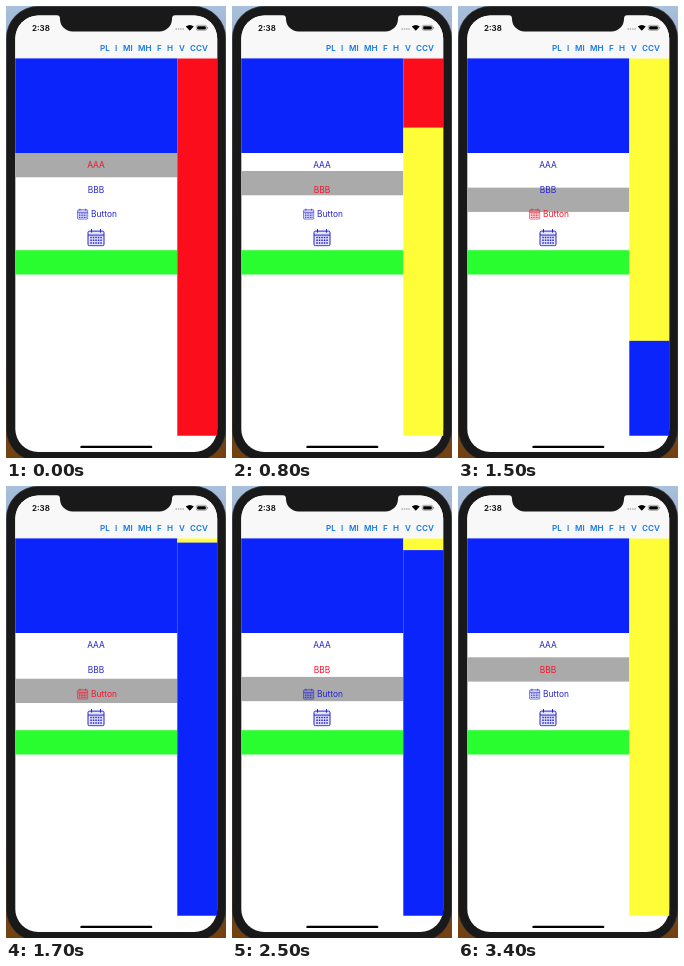
An HTML page for the animation above (3.5 s loop, 220 by 452 pixels).

```html
<!DOCTYPE html>
<html lang="en">
<head>
<meta charset="utf-8">
<title>Paged column with sliding selection</title>
<style>
  html, body { margin: 0; width: 100%; height: 100%; overflow: hidden; background: #000; }
  svg { display: block; width: 220px; height: 452px; font: 8.4px Inter, Roboto, sans-serif; }
  .item { color: #2222d4; fill: currentColor; }
  .item.on { color: #f5122a; }
  .nav { fill: #1678e8; font-weight: 600; font-size: 8.1px; }
</style>
</head>
<body>
<svg viewBox="0 0 220 452">
  <defs>
    <linearGradient id="wall" x2="0" y2="1">
      <stop offset="0" stop-color="#a9c0de"/>
      <stop offset=".5" stop-color="#55606e"/>
      <stop offset="1" stop-color="#74410f"/>
    </linearGradient>
    <clipPath id="column"><rect x="171.3" y="52.4" width="39.9" height="377.3"/></clipPath>
    <symbol id="calendar" viewBox="0 0 18 18">
      <g fill="none" stroke="currentColor">
        <rect x="1" y="2.5" width="16" height="14.7" rx="1.5" fill="currentColor" fill-opacity=".12"/>
        <path d="M1 6.5H17M4.5 .5V4M13.5 .5V4"/>
        <path d="M3.3 9H15M3.3 11.7H15M3.3 14.4H15" stroke-width="1.5" stroke-dasharray="1.5 1"/>
      </g>
    </symbol>
  </defs>

  <rect width="220" height="452" fill="url(#wall)"/>
  <rect x=".3" y=".3" width="219.4" height="455" rx="32" fill="#191919" stroke="#3a3a3c" stroke-width=".6"/>
  <rect x="9.3" y="9.6" width="201.9" height="436.4" rx="23" fill="#fff"/>
  <path d="M9.3 52.4V32.6a23 23 0 0 1 23-23H188.2a23 23 0 0 1 23 23V52.4Z" fill="#f8f8f8"/>
  <path d="M50.5 9q3.5 0 3.5 4a12.5 12.5 0 0 0 12.5 12.5h87a12.5 12.5 0 0 0 12.5-12.5q0-4 3.5-4Z" fill="#191919"/>

  <text x="26" y="24.7" font-weight="600" font-size="8">2:38</text>
  <path d="M169.5 23H178" stroke="#aaa" stroke-width="1.5" stroke-dasharray="1.4 .9"/>
  <path d="M183.8 24.8L179.8 20.6Q183.8 17.4 187.8 20.6Z"/>
  <rect x="190.3" y="19.3" width="10.4" height="5" rx="1.4" fill="none" stroke="#777" stroke-width=".6"/>
  <rect x="191.2" y="20.2" width="8.6" height="3.2" rx=".7"/>
  <path d="M201.6 21v1.7" stroke="#777" stroke-width=".8"/>
  <g id="nav" class="nav"></g>

  <rect x="9.3" y="52.4" width="162" height="94.6" fill="#0b24fb"/>
  <rect x="9.3" y="244.2" width="162" height="24.3" fill="#29fd2f"/>
  <rect id="bar" x="9.3" width="162" height="24.3" fill="#aaa"/>

  <g text-anchor="middle">
    <text class="item" x="90" y="162.1">AAA</text>
    <text class="item" x="90" y="186.5">BBB</text>
    <g class="item">
      <use href="#calendar" x="71" y="202.2" width="11.5" height="11.5"/>
      <text x="98" y="211.1">Button</text>
    </g>
    <g class="item"><use href="#calendar" x="81" y="222.6" width="18" height="18"/></g>
  </g>

  <g clip-path="url(#column)">
    <g id="pages">
      <rect x="171" y="52" width="41" height="378" fill="#fc0d1b"/>
      <rect x="171" y="430" width="41" height="378" fill="#fffd38"/>
      <rect x="171" y="808" width="41" height="378" fill="#0b24fb"/>
    </g>
  </g>
  <rect x="74.3" y="439.7" width="72" height="2.4" rx="1.2"/>
</svg>
<script>
const LOOP = 3500, STEP = 100, PAGE = 378, ROW = 24.3;
// start time and direction of each page turn
const turns = [[540, 1], [1363, 1], [2439, -1]];
const $ = id => document.getElementById(id);
const items = document.querySelectorAll('.item');
const clamp = x => Math.min(1, Math.max(0, x));
const smooth = x => x * x * x * (x * (6 * x - 15) + 10);
const easeOut = x => Math.sin(x * Math.PI / 2);
const sum = f => turns.reduce((total, [start, dir]) => total + dir * f(start), 0);

const tabs = { PL: 94, I: 109, MI: 117, MH: 132, F: 151, H: 161, V: 173, CCV: 184 };
for (const [name, x] of Object.entries(tabs))
  $('nav').innerHTML += `<text x="${x}" y="45.2">${name}</text>`;

function draw(now) {
  const t = Math.floor(now % LOOP / STEP) * STEP;
  const page = sum(start => smooth(clamp((t - start) / 380)));
  const row = sum(start => easeOut(clamp((t - start) / 490)));
  const selected = sum(start => t >= start ? 1 : 0);
  $('pages').setAttribute('transform', `translate(0 ${-page * PAGE})`);
  $('bar').setAttribute('y', 147 + row * ROW);
  items.forEach((item, i) => item.classList.toggle('on', i === selected));
  requestAnimationFrame(() => draw(performance.now()));
}
draw(performance.now());
</script>
</body>
</html>
```
